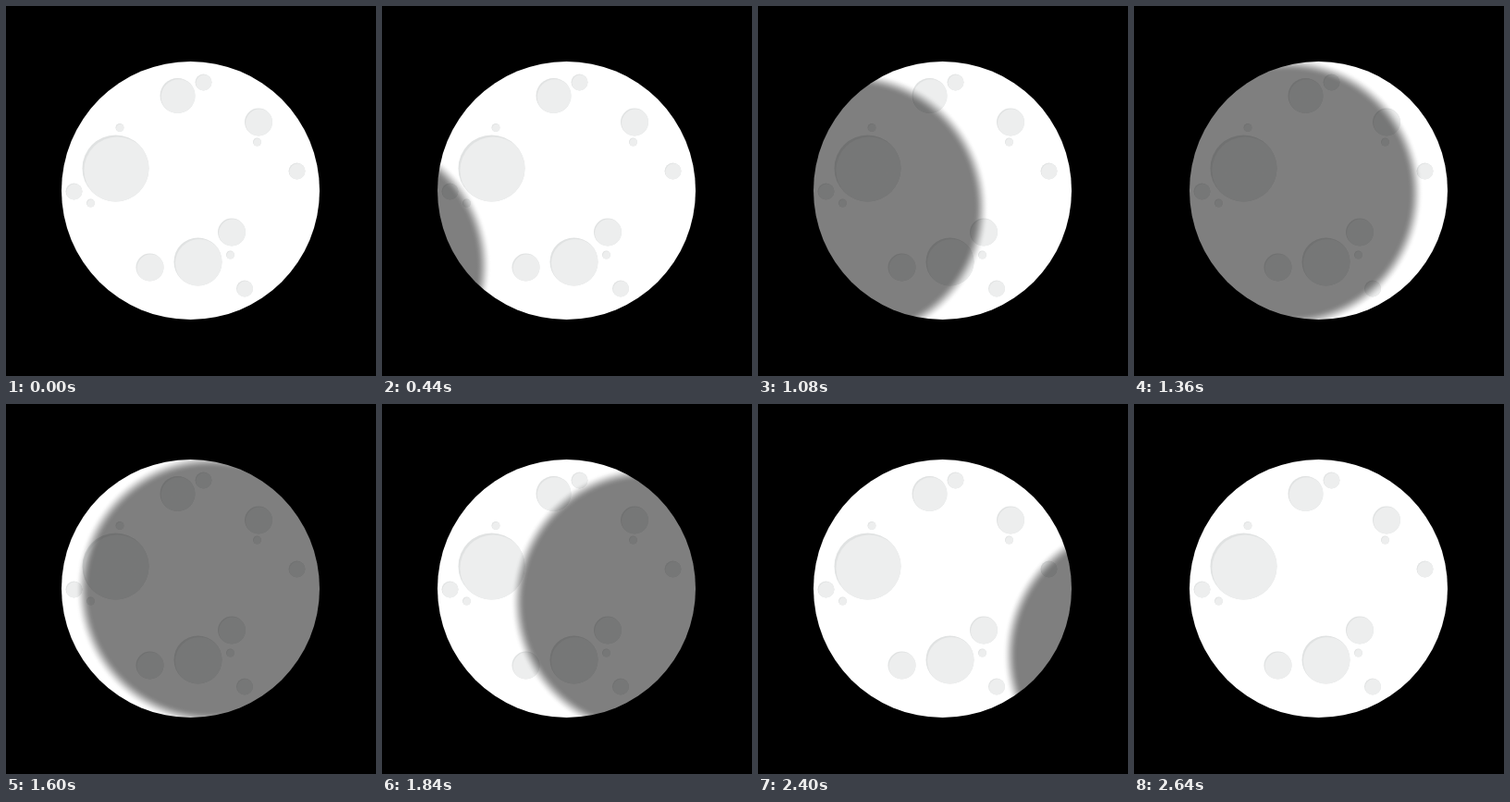
An HTML page with a canvas for the animation above (3 s loop, 400 by 400 pixels).

```html
<!DOCTYPE html>
<html lang="en">
<head>
<meta charset="utf-8">
<title>Moon phases</title>
<style>
  html, body { margin: 0; width: 100%; height: 100%; overflow: hidden; background: #000; }
  canvas { display: block; width: 400px; height: 400px; }
</style>
</head>
<body>
<canvas id="stage" width="400" height="400"></canvas>
<script>
const ctx = document.getElementById('stage').getContext('2d');
const LOOP = 3000, STEP = 40, SHADOW_START = 280, SHADOW_END = 2640;
const CENTER = 199.5, RADIUS = 139.5, SOFT = 8;

// Crater centres, grouped by radius
const craters = new Map([
  [36, [[118, 175]]],
  [26, [[207, 276]]],
  [19, [[185, 96.5]]],
  [15, [[272.5, 125], [155, 282], [243.5, 244]]],
  [9, [[213, 82], [314, 178], [73, 200], [257.5, 305]]],
  [4.5, [[271, 146.5], [91, 212.5], [122.5, 131], [242, 268.5]]]
]);

// Key times and horizontal offsets of the shadow from the moon's centre
const keys = [[SHADOW_START, -262], [1080, -98], [1600, 22.5], [1840, 86.5], [SHADOW_END, 265]];

function disc(x, y, r, fill) {
  ctx.beginPath();
  ctx.arc(x, y, r, 0, Math.PI * 2);
  ctx.fillStyle = fill;
  ctx.fill();
}

function speed(i) {
  const a = keys[Math.max(i - 1, 0)], b = keys[Math.min(i + 1, keys.length - 1)];
  return (b[1] - a[1]) / (b[0] - a[0]);
}

// Cubic Hermite interpolation between the keys
function shadowX(t) {
  const i = keys.findLastIndex(([time]) => time <= t);
  const [t0, x0] = keys[i], [t1, x1] = keys[i + 1];
  const span = t1 - t0, u = (t - t0) / span, v = 1 - u;
  return v * v * ((1 + 2 * u) * x0 + u * span * speed(i))
       + u * u * ((3 - 2 * u) * x1 - v * span * speed(i + 1));
}

// The shadow rises and sinks along a hyperbola
const shadowY = x => Math.hypot(RADIUS, 0.745 * x) - RADIUS;

function drawCrater(x, y, r) {
  const shift = 0.5 + r * 0.04;
  ctx.save();
  disc(x, y, r, '#e0e2e2');
  ctx.clip();
  disc(x + shift, y + shift, r, '#edeeee');
  ctx.restore();
}

function drawShadow(t) {
  const dx = shadowX(t), x = CENTER + dx, y = CENTER + shadowY(dx);
  const outer = RADIUS + SOFT;
  const shade = ctx.createRadialGradient(x, y, RADIUS - SOFT, x, y, outer);
  for (let u = 0; u <= 1; u += 0.125) {
    const alpha = 0.5 * (1 - u * u * (3 - 2 * u));
    shade.addColorStop(u, `rgba(0,0,0,${alpha})`);
  }
  disc(x, y, outer, shade);
}

function draw(now) {
  const t = Math.floor((now % LOOP) / STEP) * STEP;
  ctx.setTransform(1, 0, 0, 1, 0, 0);
  ctx.fillStyle = '#000';
  ctx.fillRect(0, 0, 400, 400);
  disc(CENTER, CENTER, RADIUS, '#fff');
  ctx.translate(0.5, 0.5);
  for (const [r, spots] of craters) spots.forEach(([x, y]) => drawCrater(x, y, r));
  if (t >= SHADOW_START && t < SHADOW_END) drawShadow(t);
}

let start;
function tick(now) {
  start ??= now;
  draw(now - start);
  requestAnimationFrame(tick);
}
draw(0);
requestAnimationFrame(tick);
</script>
</body>
</html>
```
